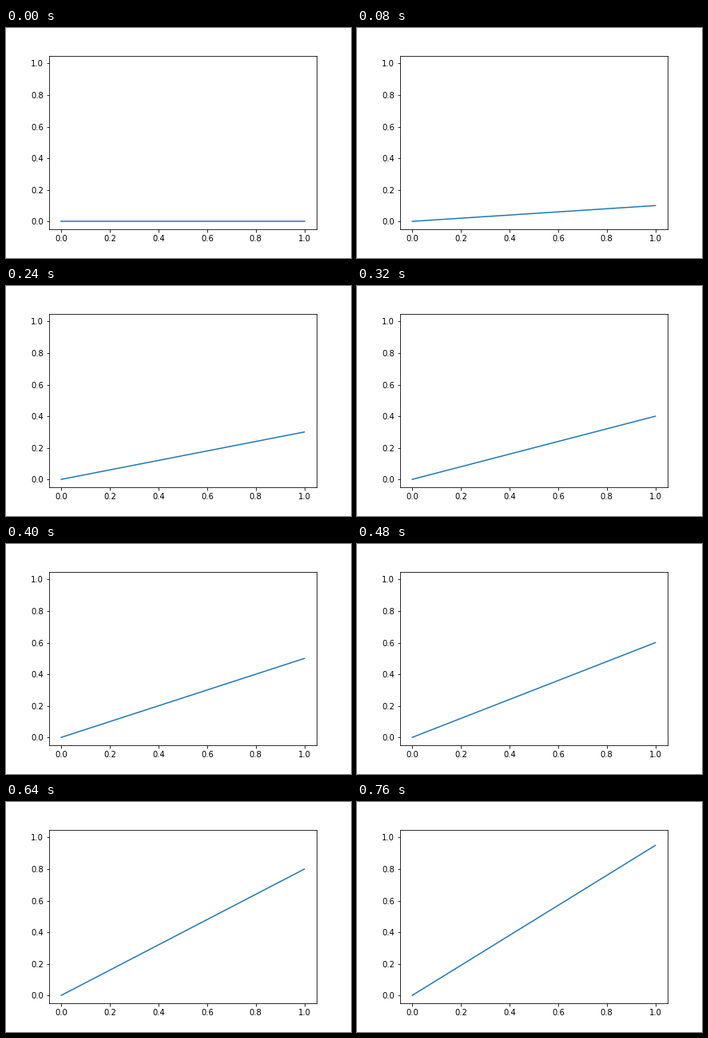
Write a matplotlib script that moves like this. It is 432 px wide and 288 px high and loops after 0.8 s.

```python
import numpy as np
import matplotlib.pyplot as plt
from matplotlib.animation import FuncAnimation

FRAMES = 20
INTERVAL = 40  # ms

plt.rcParams.update({"font.family": "DejaVu Sans", "font.size": 10})

fig, ax = plt.subplots(figsize=(6, 4), dpi=72, facecolor="white")
fig.subplots_adjust(left=0.125, right=0.9, bottom=0.125, top=0.88)
ax.set_xlim(-0.05, 1.05)
ax.set_ylim(-0.05, 1.05)
ticks = np.linspace(0, 1, 6)
ax.set_xticks(ticks)
ax.set_yticks(ticks)

x = np.linspace(0, 1, 100)
line, = ax.plot(x, 0 * x, color="#1f77b4", lw=1.5)


def update(i):
    """Tilt the line: its slope grows evenly over the loop."""
    line.set_ydata(x * i / FRAMES)
    return line,


anim = FuncAnimation(fig, update, frames=FRAMES, interval=INTERVAL,
                     repeat=True, repeat_delay=0)
plt.show()
```
